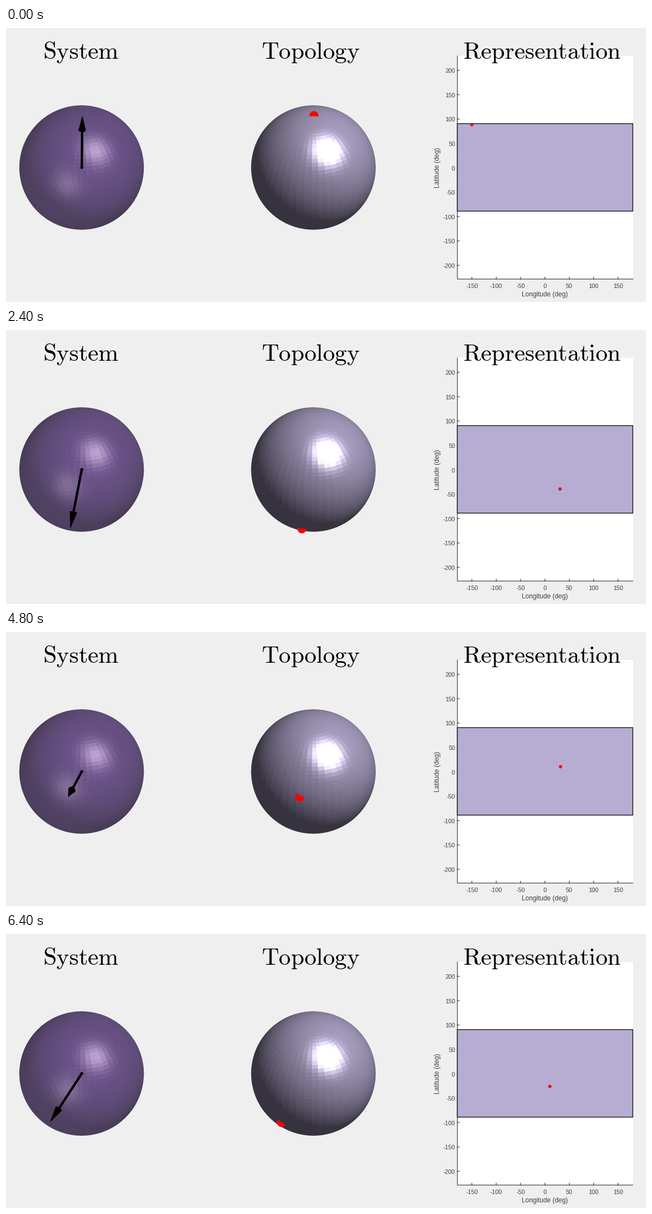
Animation, 1143 px wide and 490 px high, one loop 6.6 s. Source, as a matplotlib script:

```python
import numpy as np
import matplotlib.pyplot as plt
from matplotlib.animation import FuncAnimation
from matplotlib.patches import Circle, Polygon, Rectangle

W, H, DPI = 1143, 490, 100
FRAMES, INTERVAL = 33, 200
RADIUS, HALF, SS = 111.2, 120, 4        # sphere radius, image half size, supersampling
DROP = 0.5                              # sphere centres lie half a pixel below the image centres
SYSTEM, TOPOLOGY = (135, 249), (549, 249)
TILT = np.arctan(1 / np.sqrt(2))        # camera looks along (1, 1, 1)
CAMERA_LON = 45
LIGHT = np.array([0.433, 0.5, 0.75])    # right, up, towards the viewer
LILAC = np.array([183, 172, 210]) / 255
PURPLE = np.array([107, 71, 154]) / 255
WHITE_SHINE = 0.9 * np.ones(3)
WARM_SHINE = 0.54 * np.array([1, 0.96, 0.84])
BACKDROP = np.full(3, 239 / 255)
DEG_X, DEG_Y, ZERO_X, ZERO_Y = 0.87, 0.872, 962.5, 249.5
SUBTITLE_FRAME = 31

plt.rcParams["mathtext.fontset"] = "cm"
plt.rcParams["font.family"] = "Liberation Sans"

# frame, latitude, unwrapped longitude
WAYPOINTS = np.array([
    (0, 88, -150), (2, 61, -150), (4, 25, -150), (6, -19, -150), (9, -90, -150),
    (10, -82, -228), (11, -60, -322), (12, -40, -329), (14, -4, -330),
    (15, -4, -330), (16, 13, -334), (17, 40, -366), (18, 58, -415),
    (19, 60, -480), (20, 48, -532), (21, 30, -573), (24, 10, -688),
    (25, 0, -726), (26, -13, -765), (27, -30, -805), (29, -60, -860),
    (30, -62, -795), (31, -42.5, -743), (32, -26.5, -710),
])


def pt(pixels):
    return pixels * 72 / DPI


def project(lat, lon):
    """Unit vector of a direction as (right, up, towards the viewer)."""
    lat, phi = np.radians(lat), np.radians(lon - CAMERA_LON)
    side, near = np.cos(lat) * np.sin(phi), np.cos(lat) * np.cos(phi)
    up = np.sin(lat)
    return np.stack([side,
                     np.cos(TILT) * up - np.sin(TILT) * near,
                     np.sin(TILT) * up + np.cos(TILT) * near], axis=-1)


def facet_normals(x, y, depth):
    """Normals of a 50 by 50 sphere mesh at the given surface points."""
    up = np.cos(TILT) * y + np.sin(TILT) * depth
    near = np.cos(TILT) * depth - np.sin(TILT) * y
    lat = np.degrees(np.arcsin(np.clip(up, -1, 1)))
    lon = np.degrees(np.arctan2(x, near)) + CAMERA_LON
    return project((np.floor(lat / 3.6) + 0.5) * 3.6, (np.floor(lon / 7.2) + 0.5) * 7.2)


def lit(normals, color, specular):
    facing = normals @ LIGHT
    diffuse = np.maximum(facing, 0)[..., None]
    mirror = np.maximum(2 * facing * normals[..., 2] - LIGHT[2], 0)
    shine = np.where(facing > 0, mirror ** 10, 0)[..., None] * specular
    return np.clip(color * (0.3 + 0.6 * diffuse) + shine, 0, 1)


def downsample(values):
    n = 2 * HALF
    return values.reshape(n, SS, n, SS, -1).mean(axis=(1, 3))


steps = (np.arange(2 * HALF * SS) + 0.5) / SS - HALF
GX, GY = np.meshgrid(steps / RADIUS, (DROP - steps) / RADIUS)
INSIDE = GX ** 2 + GY ** 2 <= 1
DEPTH = np.sqrt(np.maximum(1 - GX ** 2 - GY ** 2, 0))


def sphere_image(rgb):
    return np.clip(np.dstack([downsample(rgb), downsample(INSIDE)]), 0, 1)


def marker_image(point):
    """Red disc facing the viewer, hidden where the sphere is in front of it."""
    disc = (GX - point[0]) ** 2 + (GY - point[1]) ** 2 <= (8 / RADIUS) ** 2
    seen = disc & (~INSIDE | (DEPTH < point[2] + 0.015))
    image = np.zeros((2 * HALF, 2 * HALF, 4))
    image[..., 0] = 1
    image[..., 3] = downsample(seen)[..., 0]
    return image


fig = plt.figure(figsize=(W / DPI, H / DPI), dpi=DPI, facecolor=BACKDROP)
ax = fig.add_axes([0, 0, 1, 1])
ax.axis("off")


def place_image(data, center, zorder):
    cx, cy = center
    return ax.imshow(data, extent=(cx - HALF, cx + HALF, cy + HALF, cy - HALF),
                     aspect="auto", interpolation="nearest", zorder=zorder)


def label(x, y, text, size, color="#404040", ha="center", va="center", **kw):
    return ax.text(x, y, text, fontsize=pt(size), color=color, ha=ha, va=va, **kw)


# Spheres
front = facet_normals(GX, GY, DEPTH)
back = -facet_normals(GX, GY, -DEPTH)
alpha = 0.6
behind = alpha * lit(back, PURPLE, WARM_SHINE) + (1 - alpha) * BACKDROP
glass = alpha * lit(front, PURPLE, WARM_SHINE) + (1 - alpha) * behind
place_image(sphere_image(glass), SYSTEM, 2)
place_image(sphere_image(lit(front, LILAC, WHITE_SHINE)), TOPOLOGY, 2)
marker = place_image(marker_image(project(88, -150)), TOPOLOGY, 3)

# Latitude and longitude chart
ax.add_patch(Rectangle((806, 50), 313.5, 399, fc="white", ec="none", zorder=1))
ax.add_patch(Rectangle((806, 171), 313.4, 156.5, fc=LILAC, ec="#252228",
                       lw=pt(1.5), snap=False, zorder=3))
axis_style = dict(color="#404040", lw=pt(1.2), snap=False, zorder=2)
ax.plot([806.2, 806.2, 1119.5], [50, 449, 449], **axis_style)
for lon in range(-150, 151, 50):
    x = ZERO_X + lon * DEG_X
    ax.plot([x, x], [449, 445.5], **axis_style)
    label(x, 461, str(lon), 10.7, va="center_baseline")
for lat in range(-200, 201, 50):
    y = ZERO_Y + 0.5 - lat * DEG_Y
    ax.plot([806, 809.5], [y, y], **axis_style)
    label(802, y + 0.5, str(lat), 10.7, ha="right", va="center_baseline")
label(962.5, 476.5, "Longitude (deg)", 11.7)
label(771, 249.5, "Latitude (deg)", 11.7, rotation=90)
chart_dot = ax.add_patch(Circle((0, 0), 3, fc="#ee0c1c", ec="none", zorder=4))

for x, title in ((134, "System"), (544.6, "Topology"), (957.5, "Representation")):
    label(x, 55, rf"$\mathrm{{{title}}}$", 42.9, "black", va="baseline", zorder=6)

# Arrow
ORIGIN = np.array(SYSTEM) + (0.3, DROP)
shaft, = ax.plot([], [], color="black", lw=pt(4.2), solid_capstyle="butt", zorder=4)
cone = ax.add_patch(Polygon([(0, 0)] * 3, fc="black", ec="none", zorder=4))
cone_base = ax.add_patch(Polygon([(0, 0)] * 3, fc="black", ec="none", zorder=4))
ax.add_patch(Circle(ORIGIN, 2.7, fc="black", ec="none", zorder=4))

# Subtitle over a fading shade
shade = np.zeros((165, 1, 4))
shade[:, 0, 3] = 0.2 * np.linspace(0, 1, 165) ** 1.2
subtitle = [
    ax.imshow(shade, extent=(0, W, H, 325), aspect="auto", interpolation="nearest", zorder=8),
    ax.add_patch(Rectangle((222, 467), 654, 23, fc="#343436", ec="none", zorder=9)),
    label(549, 497.5, "This video shows the changing representation", 31.3,
          "white", va="baseline", zorder=10),
]
ax.set_xlim(0, W)
ax.set_ylim(H, 0)


def draw_arrow(point):
    tip = ORIGIN + RADIUS * point[:2] * (1, -1)
    along = (tip - ORIGIN) / np.hypot(*(tip - ORIGIN))
    across = np.array([-along[1], along[0]])
    neck = ORIGIN + 0.72 * (tip - ORIGIN)
    turn = np.linspace(0, 2 * np.pi, 40)[:, None]
    shaft.set_data(*zip(ORIGIN, neck))
    cone.set_xy([tip, neck + 6.5 * across, neck - 6.5 * across])
    cone_base.set_xy(neck + 6.5 * (np.cos(turn) * across + abs(point[2]) * np.sin(turn) * along))


def update(frame):
    lat, lon = (np.interp(frame, WAYPOINTS[:, 0], WAYPOINTS[:, i]) for i in (1, 2))
    point = project(lat, lon)
    draw_arrow(point)
    marker.set_data(marker_image(point))
    wrapped = (lon + 180) % 360 - 180
    chart_dot.center = (ZERO_X + wrapped * DEG_X, ZERO_Y - lat * DEG_Y)
    for artist in subtitle:
        artist.set_visible(frame == SUBTITLE_FRAME)
    return [shaft, cone, cone_base, marker, chart_dot, *subtitle]


anim = FuncAnimation(fig, update, frames=FRAMES, interval=INTERVAL, repeat=True, repeat_delay=0)
plt.show()
```
